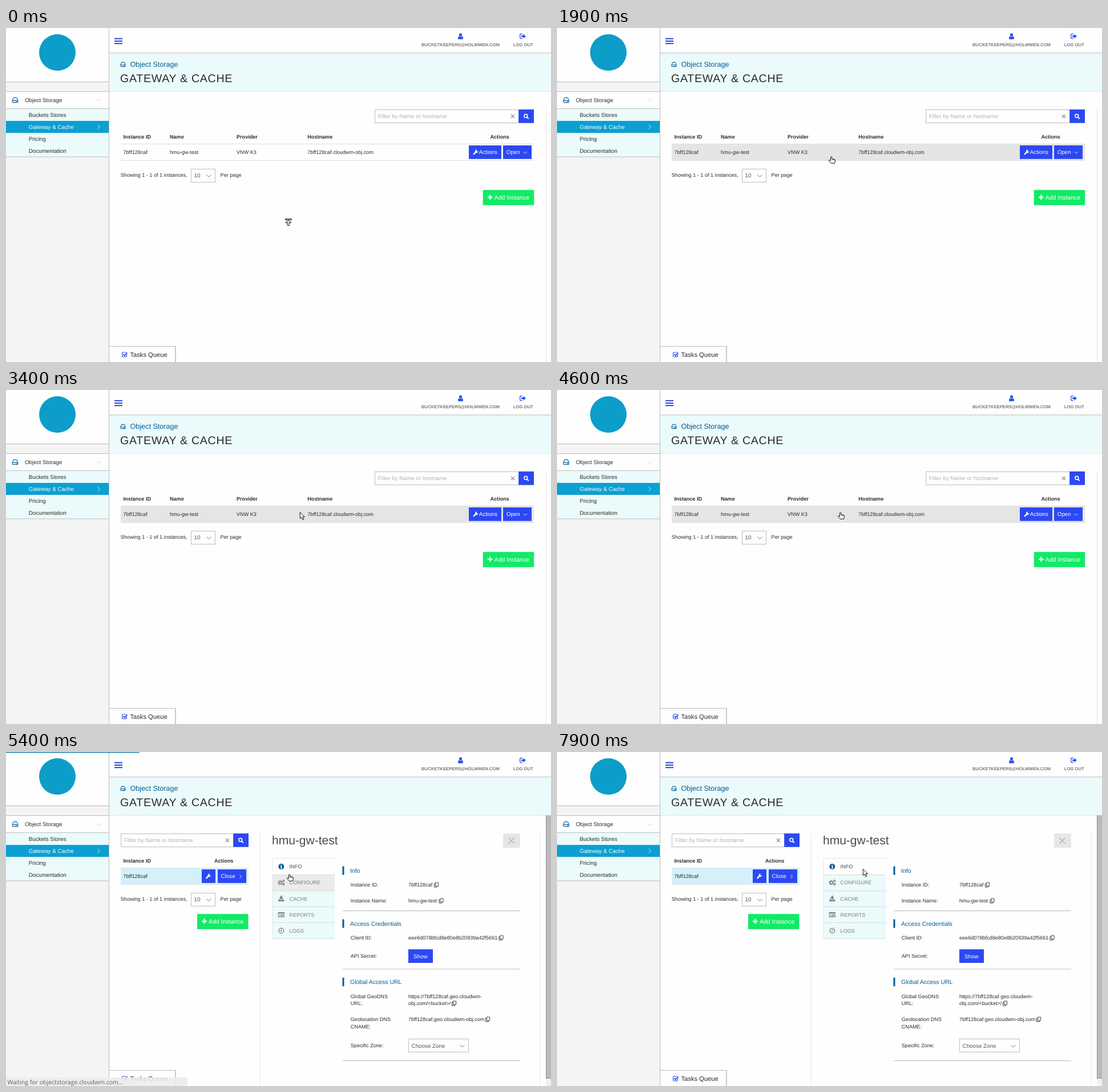
An HTML page for the animation above (8 s loop, 955x586 px).

```html
<!DOCTYPE html>
<html lang="en">
<head>
<meta charset="utf-8">
<title>Gateway &amp; Cache</title>
<style>
  html, body { margin: 0; width: 100%; height: 100%; overflow: hidden; background: #fefefe; }
  svg { display: block; width: 955px; height: 586px; }
  text { font-family: "Liberation Sans", Arial, sans-serif; text-rendering: geometricPrecision; white-space: pre; }
  .status { font-family: "Open Sans", "Noto Sans", sans-serif; }
</style>
</head>
<body>
<svg id="stage" viewBox="0 0 955 586"></svg>
<script>
const BLUE = '#2c48f3', ICON_BLUE = '#2a55ea', LINK = '#045c94', INK = '#2b2b2b', GREY = '#7d7d7d';
const PALE = '#ebfafa', LINE = '#bdbdbd', FAINT = '#e6e6e6', WHITE = '#fefefe';
const LOOP = 8000, STEP = 100;
const CONTROL = 23.8; // height of inputs and buttons

// Drawing helpers; text is placed by the middle of its capitals.
const rect = (x, y, w, h, fill, extra = '') =>
  `<rect x="${x}" y="${y}" width="${w}" height="${h}" fill="${fill}" ${extra}/>`;
const frame = (x, y, w, h, color = LINE, fill = WHITE) =>
  rect(x + .5, y + .5, w - 1, h - 1, fill, `stroke="${color}"`);
const text = (x, y, str, size = 9.1, fill = INK, extra = '') =>
  `<text x="${x}" y="${y + size * .33}" font-size="${size}" fill="${fill}" ${extra}>${str}</text>`;
const bold = (x, y, str, size = 9.1, fill = INK, extra = '') =>
  text(x, y, str, size, fill, 'font-weight="bold" ' + extra);
const stroke = (d, color, width = 1, extra = '') =>
  `<path d="${d}" fill="none" stroke="${color}" stroke-width="${width}" ${extra}/>`;
const fill = (d, color, extra = '') => `<path d="${d}" fill="${color}" ${extra}/>`;
const at = (x, y, body, scale = 1) => `<g transform="translate(${x} ${y}) scale(${scale})">${body}</g>`;
const group = (id, body) => `<g id="${id}">${body}</g>`;

const icons = {
  drive: c => stroke('M-4.8 .8L-3-3.6Q-2.8-4.2-2-4.2H2Q2.8-4.2 3-3.6L4.8 .8V3Q4.8 4.2 3.8 4.2H-3.8Q-4.8 4.2-4.8 3ZM-4.8 .8H4.8M1 2.5H3.5', c, 1.2),
  user: c => `<circle cy="-2.6" r="2.6" fill="${c}"/>` + fill('M-4.3 5.2Q-5-.3-2 0Q0 1.6 2 0Q5-.3 4.3 5.2Z', c),
  exit: c => stroke('M-1-4H-3.2Q-4.8-4-4.8-2.5V2.5Q-4.8 4-3.2 4H-1', c, 1.3) + fill('M-2.3-1.4H1V-4L5.4 0L1 4V1.4H-2.3Z', c),
  search: c => `<circle cx="-.7" cy="-.7" r="2.9" fill="none" stroke="${c}" stroke-width="1.6"/>` + stroke('M1.4 1.4L4.3 4.3', c, 1.9),
  wrench: c => stroke('M-3.2 3.2L1.2-1.2', c, 2.5, 'stroke-linecap="round"') +
    fill('M2.6-4.4Q-1-5-1.1-1.4Q-.5 1.4 2 1.2Q4.4 .7 4.5-2.2L2.4-.9L1-2.3Z', c),
  plus: c => stroke('M-4.2 0H4.2M0-4.2V4.2', c, 2.5),
  cross: c => stroke('M-3-3L3 3M3-3L-3 3', c, 1.2),
  close: c => stroke('M-5-5L5 5M5-5L-5 5', c, 1),
  down: c => stroke('M-4-2L0 2L4-2', c, 1),
  right: c => stroke('M-1.8-3.5L1.8 0L-1.8 3.5', c, 1),
  check: c => stroke('M3.4 0V2.6Q3.4 4-1 4H-3Q-4.4 4-4.4 2.6V-2.6Q-4.4-4-3-4H2.6', c, 1.2) +
    stroke('M-2.5-.6L-.4 1.6L4.5-3.2', c, 1.9),
  info: c => `<circle r="5" fill="${c}"/>` + stroke('M0-3.2V-1.6M-1.1-.4H.3V3M-1.3 2.8H1.3', WHITE, 1.5),
  gears: c => `<g fill="none" stroke="${c}"><circle cx="-1.8" r="2.5" stroke-width="1.7"/>
    <circle cx="-1.8" r="3.8" stroke-dasharray="1.5 1.48"/><circle cx="3.9" cy="-2.9" r="1.5" stroke-width="1.3"/>
    <circle cx="3.9" cy="2.9" r="1.5" stroke-width="1.3"/></g>`,
  download: c => fill('M-1.5-5H1.5V-1.8H4L0 2L-4-1.8H-1.5ZM-5 1.6H-2L0 3.3L2 1.6H5V4.8H-5Z', c),
  list: c => stroke('M-5-3.8H5V3.8H-5Z', c, 1.1) + stroke('M-5-3.2H5', c, 1.8) +
    stroke('M-3.5-.8H-2.3M-1.5-.8H3.6M-3.5 .8H-2.3M-1.5 .8H3.6M-3.5 2.4H-2.3M-1.5 2.4H3.6', c, .9),
  clock: c => `<circle r="4.3" fill="none" stroke="${c}" stroke-width="1.3"/>` + stroke('M.3-2.6V.5H-1.8', c, 1.1),
  copy: c => stroke('M-1.6-4H3.6V2.2H-1.6ZM-1.6-2H-3.6V4.1H1.4V2.2', c, .9)
};
const icon = (name, x, y, color, scale) => at(x, y, icons[name](color), scale);
const button = (x, y, w, color = BLUE, h = CONTROL) => rect(x, y, w, h, color);

const search = (x, right) =>
  frame(x, 143, right - x - 26, 24) +
  text(x + 5.8, 155, 'Filter by Name or hostname', 9.8, '#b3b3b3') +
  icon('cross', right - 37, 155, '#8b8b8b') +
  button(right - 26.8, 142.9, 26.8) + icon('search', right - 13.5, 155, WHITE);

const addButton = x => button(x, 284.2, 89.5, '#12ea67', 26.6) +
  icon('plus', x + 12.5, 297, WHITE) + text(x + 20, 297.5, 'Add Instance', 10.5, WHITE);

const pager = text(200.8, 257.5, 'Showing 1 - 1 of 1 instances,') + frame(324, 247, 43, 24) +
  text(329.5, 259, '10', 9.8, '#555') + icon('down', 355.5, 259.5, '#4d78b8') + text(375.6, 257.5, 'Per page');

function shell() {
  const menu = ['Buckets Stores', 'Gateway &amp; Cache', 'Pricing', 'Documentation'];
  return rect(0, 0, 955, 586, WHITE) +
    rect(0, 0, 180, 586, '#f4f4f4') + rect(0, 0, 180, 94, WHITE) + rect(0, 112, 180, 30, WHITE) +
    rect(0, 142, 180, 84, PALE) + rect(0, 163, 180, 21, '#0c9fd2') +
    stroke('M0 94.5H180M0 111.5H180M0 141.5H180M0 226H180M180.5 0V586', LINE) +
    '<circle cx="90" cy="43" r="32" fill="#0c9dc9"/>' +
    icon('drive', 16, 126.5, '#11699f') + text(33, 127, 'Object Storage', 9.8) + icon('down', 162.5, 127, '#d6d6d6') +
    menu.map((label, i) => text(39.8, 152.8 + 20.9 * i, label, 9.8, i == 1 ? WHITE : INK)).join('') +
    icon('right', 162.5, 173.5, '#d9f2fb') +
    stroke('M190 18.8H204M190 23H204M190 27.2H204', '#2946d2', 1.9) +
    icon('user', 796.5, 14.5, ICON_BLUE) + icon('exit', 905.5, 14.5, ICON_BLUE) +
    bold(796.5, 29.5, 'BUCKETKEEPERS@HOLMWEN.COM', 7.7, '#777', 'text-anchor="middle"') +
    bold(906.3, 29.5, 'LOG OUT', 7.7, '#777', 'text-anchor="middle"') +
    rect(181, 44, 774, 68, PALE) + stroke('M181 43.8H955', LINE) + stroke('M181 111.5H955', '#e2e9e9') +
    icon('drive', 205, 64, '#11699f', .86) + text(217.5, 63.5, 'Object Storage', 12.6, LINK) +
    text(200, 88.5, 'GATEWAY &amp; CACHE', 19.6, INK, 'letter-spacing=".7"');
}

function wideView() {
  const columns = [[205.5, 'Instance ID', '7bff128caf'], [287, 'Name', 'hmu-gw-test'],
    [404, 'Provider', 'VNW K3'], [528.3, 'Hostname', '7bff128caf.cloudwm-obj.com']];
  return search(646, 925) + stroke('M946.5 143V586', FAINT) +
    rect(201, 204, 724, 28, '#e5e5e5', 'id="rowHover"') +
    stroke('M201 203.5H925M201 232.5H925', '#dedede') +
    columns.map(([x, head, value]) => bold(x, 191, head) + text(x, 218, value)).join('') +
    bold(848.5, 191, 'Actions') +
    button(811, 206, 57) + icon('wrench', 823, 218, WHITE) + text(828.8, 218, 'Actions', 9.8, WHITE) +
    button(871, 206, 50) + text(876.8, 218, 'Open', 9.8, WHITE) + icon('down', 910, 218.5, WHITE, .8) +
    pager + addButton(835.7);
}

function splitView() {
  const tabs = [['INFO', 'info'], ['CONFIGURE', 'gears'], ['CACHE', 'download'], ['REPORTS', 'list'], ['LOGS', 'clock']];
  const sections = [[208, 'Info'], [301, 'Access Credentials'], [403.5, 'Global Access URL']];
  const labels = [[233, 'Instance ID:'], [261, 'Instance Name:'], [326, 'Client ID:'], [357.5, 'API Secret:'],
    [428.5, 'Global GeoDNS'], [441, 'URL:'], [469, 'Geolocation DNS'], [481.5, 'CNAME:'], [515, 'Specific Zone:']];
  const values = [[233, '7bff128caf', 754], [261, 'hmu-gw-test', 762.5],
    [326, 'eee6d078bfcd8e80e8b20939a42f5661', 867.5], [428.5, 'https://7bff128caf.geo.cloudwm-'],
    [441, 'obj.com/&lt;bucket&gt;/', 785], [469, '7bff128caf.geo.cloudwm-obj.com', 844]];
  return search(201, 425) + rect(201, 204, 223.5, 28.5, '#d3f0fb') + stroke('M201 203.5H425M201 232.5H425', '#d9e6ea') +
    bold(205.5, 191, 'Instance ID') + bold(365, 191, 'Actions') + text(205.5, 218, '7bff128caf') +
    button(343, 206, 24) + icon('wrench', 354.5, 218, WHITE) +
    button(371, 206, 50) + text(376.6, 218, 'Close', 9.8, WHITE) + icon('right', 411, 218.5, WHITE, .9) +
    pager + addButton(335) + stroke('M445.5 143V586M936.5 143V586', FAINT) +
    rect(946, 111, 9, 462, '#bababa') + stroke('M946.5 111V573M946 572.5H955', '#8e8e8e') +
    rect(946, 573, 9, 13, '#f1f1f1') +
    text(466, 155.5, 'hmu-gw-test', 21, '#4b4b4b') +
    rect(871, 143, 30, 25, '#e6e6e6') + icon('close', 885.5, 155.5, '#858585') +
    rect(467, 215, 109, 112, PALE) + rect(467, 215, 109, 28, '#ebebeb', 'id="tabHover"') +
    stroke('M467 187V327M467 186.5H576', '#e4e4e4') +
    stroke('M467 215.5H576M467 243.5H576M467 271.5H576M467 299.5H576M467 327.5H576', '#d0dede') +
    tabs.map(([label, name], i) => icon(name, 482.3, 201 + 28.1 * i, i ? GREY : LINK) +
      text(496.6, 201.3 + 28.1 * i, label, 9.1, i ? GREY : '#444')).join('') +
    sections.map(([y, label]) => rect(589.5, y - 7.5, 3, 15, LINK) + text(603, y + .5, label, 10.5, LINK)).join('') +
    stroke('M590 278.5H901M590 380.8H901M590 541.5H901', '#cbcbcb', 1.3) +
    labels.map(([y, label]) => text(603.8, y, label)).join('') +
    values.map(([y, value, x]) => text(705, y, value) + (x ? icon('copy', x, y, '#333') : '')).join('') +
    button(705, 346.2, 43) + text(714, 358.3, 'Show', 9.8, WHITE) +
    frame(705, 503, 106, 24) + text(710.6, 515.3, 'Choose Zone', 9.8, '#555') + icon('down', 799.5, 516, '#4d78b8');
}

const tasksQueue = rect(181, 558, 117, 28, WHITE) + stroke('M181 558.5H298', LINE) +
  stroke('M297 558V586', LINE, 1.6) + icon('check', 208, 573, ICON_BLUE) + text(217.4, 573, 'Tasks Queue', 11.2, INK);

const statusBubble = fill('M0 571H314Q318 571 318 575V586H0Z', '#ededed', 'opacity=".9"') +
  text(2.5, 579.3, 'Waiting for objectstorage.cloudwm.com…', 10.5, '#5e5e5e', 'class="status"');

const outline = 'stroke="#111" stroke-linejoin="round"';
const cursors = {
  scroll: rect(1.2, .9, 11, 1.7, WHITE, outline) +
    fill('M6.7 3.4L11.6 7.2L10.8 8.2L8.2 6.9V12.6H5.2V6.9L2.6 8.2L1.8 7.2Z', WHITE, outline),
  arrow: fill('M.3 .5V11.6L2.9 9.3L4.8 13.8L6.8 12.9L4.9 8.6H8.4Z', WHITE, outline),
  hand: fill('M4 8V1.8a1.1 1.1 0 0 1 2.2 0V5h3.6q2 .2 2 2v2L11 12.3H5L1.1 8.3Q.4 7.2 1.3 6.7T4 8Z', WHITE, outline) +
    stroke('M8 5.2V7M9.9 5.3V7', '#111', .8)
};

document.getElementById('stage').innerHTML = shell() + group('wide', wideView()) + group('split', splitView()) +
  tasksQueue + group('status', statusBubble) + rect(0, 0, 0, 1.4, '#1380a8', 'id="progress"') +
  group('cursor', Object.entries(cursors).map(([kind, body]) => group(kind, body)).join(''));

// Pointer path: time, x, y, shape from then on.
const path = [
  [0, 488, 334, 'scroll'], [499, 488, 334, 'scroll'], [500, 494, 334, 'arrow'], [1000, 494, 334, 'arrow'],
  [1700, 477, 230, 'hand'], [1900, 475.5, 225, 'hand'], [2200, 475.5, 220, 'hand'], [2500, 475.5, 220, 'hand'],
  [2800, 291, 218, 'hand'], [3200, 625, 214, 'hand'], [3400, 515, 214, 'arrow'], [3500, 515, 214, 'arrow'],
  [3600, 570, 214, 'hand'], [3700, 625, 214, 'hand'], [3800, 579, 214, 'hand'], [4100, 579, 214, 'hand'],
  [4600, 491.5, 214, 'hand'], [6600, 491.5, 214, 'hand'], [6700, 493.5, 214, 'hand'], [6800, 493.5, 214, 'hand'],
  [6900, 500, 214, 'arrow'], [7000, 502, 214, 'arrow'], [7100, 502, 214, 'arrow'], [7900, 536, 205, 'arrow'],
  [LOOP, 536, 205, 'arrow']
];
const OPENED = 5300;
const el = id => document.getElementById(id);
const show = (id, visible) => el(id).style.display = visible ? '' : 'none';
const within = (t, from, to) => t >= from && t < to;

function render(t) {
  const i = path.findLastIndex(key => key[0] <= t);
  const [t0, x0, y0, shape] = path[i], [t1, x1, y1] = path[i + 1];
  const k = (t - t0) / (t1 - t0);
  el('cursor').setAttribute('transform', `translate(${x0 + (x1 - x0) * k} ${y0 + (y1 - y0) * k})`);
  for (const kind in cursors) show(kind, kind === shape);

  show('wide', t < OPENED);
  show('split', t >= OPENED);
  show('rowHover', within(t, 1700, OPENED));
  show('tabHover', within(t, OPENED, 6900));
  show('status', within(t, 5100, 5500));
  show('progress', within(t, 5100, 5700));
  el('progress').setAttribute('width', t < 5500 ? 76 + (t - 5100) * .525 : 955);
  el('progress').setAttribute('opacity', t < 5600 ? 1 : .5);
}

function tick() {
  render(Math.floor(performance.now() % LOOP / STEP) * STEP);
  requestAnimationFrame(tick);
}
tick();
</script>
</body>
</html>
```
